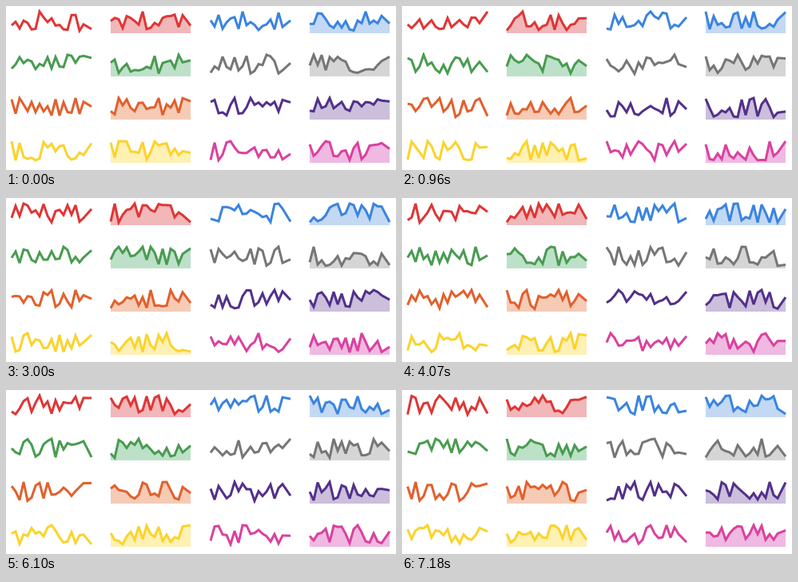
Recreate the animation shown at these times as a matplotlib script. Size 488x205 px, loop 8000 ms.

```python
import matplotlib.pyplot as plt
import numpy as np
from matplotlib.animation import FuncAnimation
from matplotlib.patches import Polygon, Rectangle

W, H, DPI = 488, 205, 64
LOOP, STEP = 8000, 20
CHANGES = [960, 2040, 3000, 4070, 5150, 6100, 7180]

POINTS = 20
TOP, DEPTH, BASE = 7, 24, 34       # peak, distance to zero, foot of the area
COLUMNS = [7, 131, 256, 380]
ROW_PITCH = 54

# stroke and area colour; two hues share each row
HUES = [
    ("#df3635", "#f1b7b9"), ("#3a84e0", "#c3d8f3"),
    ("#489c50", "#bde0c8"), ("#767676", "#d5d5d5"),
    ("#e2602c", "#f5cbb6"), ("#53308a", "#cbbfdb"),
    ("#fbd32b", "#fff0b4"), ("#da419f", "#efb9e1"),
]

fig = plt.figure(figsize=(W / DPI, H / DPI), dpi=DPI, facecolor="white")
ax = fig.add_axes([0, 0, 1, 1])
ax.set_xlim(0, W)
ax.set_ylim(H, 0)
ax.axis("off")

# Even whole-pixel steps; the last point is pinned to the right edge.
offsets = np.append(np.arange(POINTS - 1) * 5, 100)


class Sparkline:
    def __init__(self, left, top, stroke, fill=None):
        self.x = left + offsets
        self.top = top
        self.area = None
        clip = Rectangle((left - 3, top + TOP - 3), 106, 30,
                         transform=ax.transData)
        if fill:
            self.area = ax.add_patch(
                Polygon([(left, top), (left, top + 1)], fc=fill, lw=0))
            self.area.set_clip_path(clip)
        self.line, = ax.plot([], [], color=stroke, lw=3 * 72 / DPI,
                             solid_joinstyle="miter", solid_capstyle="butt")
        self.line.set_clip_path(clip)

    def show(self, values):
        y = self.top + TOP + DEPTH * (1 - values / values.max())
        self.line.set_data(self.x, y)
        if self.area:
            foot = self.top + BASE
            self.area.set_xy([(self.x[0], foot), *zip(self.x, y),
                              (self.x[-1], foot)])


charts = []
for i, (stroke, fill) in enumerate(HUES):
    row, side = divmod(i, 2)
    top = row * ROW_PITCH
    charts.append(Sparkline(COLUMNS[2 * side], top, stroke))
    charts.append(Sparkline(COLUMNS[2 * side + 1], top, stroke, fill))

rng = np.random.default_rng(20)
data = rng.uniform(0, 50, (len(CHANGES) + 1, len(charts), POINTS))


def draw(frame):
    now = frame * STEP + STEP / 2
    state = np.searchsorted(CHANGES, now, side="right")
    for chart, values in zip(charts, data[state]):
        chart.show(values)
    return [chart.line for chart in charts]


anim = FuncAnimation(fig, draw, frames=LOOP // STEP, interval=STEP,
                     repeat=True, repeat_delay=0)
plt.show()
```
